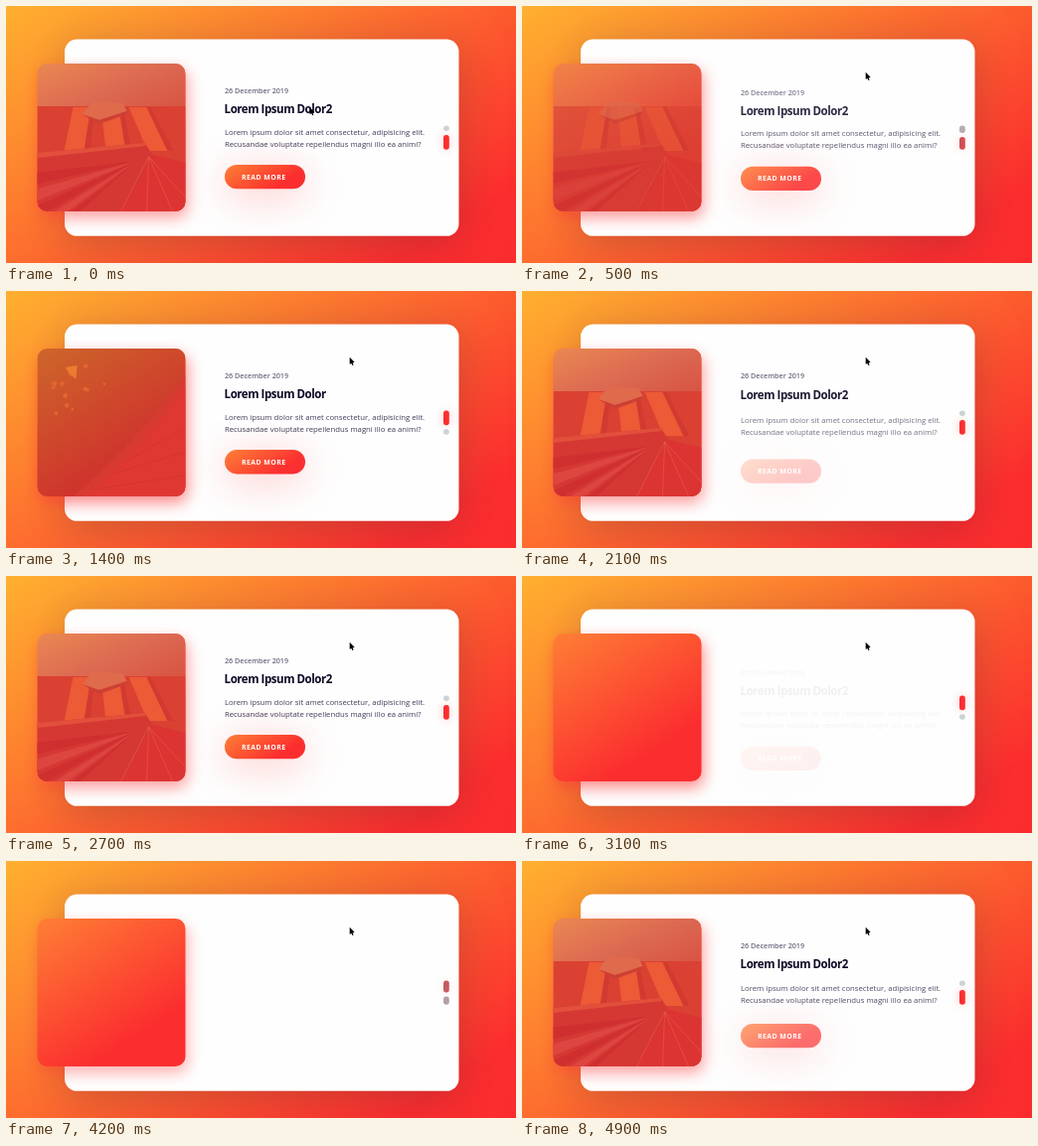
An HTML page with a canvas that plays this animation: 513x259 px, repeating every 5 s.

```html
<!DOCTYPE html>
<html lang="en">
<head>
<meta charset="utf-8">
<title>Blog slider</title>
<style>
html, body { margin: 0; width: 100%; height: 100%; overflow: hidden; background: #fd6a2e; }
canvas { display: block; width: 513px; height: 259px; }
</style>
</head>
<body>
<canvas id="stage"></canvas>
<script>
const W = 513, H = 259, LOOP = 5000, STEP = 100;
const dpr = window.devicePixelRatio || 1;
const canvas = document.getElementById('stage');
canvas.width = Math.round(W * dpr);
canvas.height = Math.round(H * dpr);
const ctx = canvas.getContext('2d');
ctx.scale(dpr, dpr);

const FONT = '"Open Sans", "Noto Sans", sans-serif';
const CARD = { x: 59, y: 33.5, w: 396.5, h: 198.3, r: 12.4 };
const BOX = { x: 31.5, y: 58, w: 149, h: 149, r: 10 };
const BUTTON = { x: 220, y: 160, w: 81, h: 24.3, r: 12.1 };
const SIDE = BOX.w;
const DROP = 12.4;
const WARM = '#fe7f35', RED = '#fb2e2f';

// Each change swaps between slides 2 and 1; the loop opens on slide 2
const changes = [-LOOP, 450, 1430, 2820, 4140];

const clamp = v => Math.min(1, Math.max(0, v));
const mix = (a, b, k) => a + (b - a) * k;

// cubic-bezier(.25, .1, .25, 1)
function ease(v) {
  const x = clamp(v);
  if (x === 0 || x === 1) return x;
  const curve = (s, a, b) => 3 * s * (1 - s) ** 2 * a + 3 * s * s * (1 - s) * b + s ** 3;
  let lo = 0, hi = 1;
  for (let i = 0; i < 24; i++) {
    const mid = (lo + hi) / 2;
    if (curve(mid, .25, .25) < x) lo = mid; else hi = mid;
  }
  return curve(lo, .1, 1);
}

function seeded(seed) {
  return () => (seed = seed * 16807 % 2147483647) / 2147483647;
}

// Linear gradient at 147 degrees, as in CSS
function slant(b, from, to, end = .74) {
  const a = 147 * Math.PI / 180, sx = Math.sin(a), sy = -Math.cos(a);
  const half = (b.w * sx + b.h * sy) / 2;
  const cx = b.x + b.w / 2, cy = b.y + b.h / 2;
  const g = ctx.createLinearGradient(cx - sx * half, cy - sy * half, cx + sx * half, cy + sy * half);
  g.addColorStop(0, from);
  g.addColorStop(end, to);
  return g;
}

function roundPath(b) {
  ctx.beginPath();
  ctx.roundRect(b.x, b.y, b.w, b.h, b.r);
}

function panel(b, fill, alpha, shadow) {
  ctx.save();
  ctx.globalAlpha = alpha;
  ctx.shadowColor = shadow.color;
  ctx.shadowBlur = shadow.blur * dpr;
  ctx.shadowOffsetX = (shadow.x || 0) * dpr;
  ctx.shadowOffsetY = (shadow.y || 0) * dpr;
  ctx.fillStyle = fill;
  roundPath(b);
  ctx.fill();
  ctx.restore();
}

function label(str, x, y, font, color, spacing = 0) {
  ctx.font = font + ' ' + FONT;
  ctx.letterSpacing = spacing + 'px';
  ctx.fillStyle = color;
  ctx.fillText(str, x, y);
}

function poly(color, ...pts) {
  ctx.fillStyle = color;
  ctx.beginPath();
  for (let i = 0; i < pts.length; i += 2) ctx.lineTo(pts[i], pts[i + 1]);
  ctx.fill();
}

// Both pictures use local coordinates, 0 to SIDE
function leaves() {
  ctx.fillStyle = slant({ x: 0, y: 0, w: SIDE, h: SIDE }, '#cd662a', '#cf302d');
  ctx.fillRect(0, 0, SIDE, SIDE);

  // Cloth in the lower right corner, with a hem and stitched rows
  for (const [shift, color] of [[0, '#d63a30'], [12, '#df3833']]) {
    ctx.fillStyle = color;
    ctx.beginPath();
    ctx.moveTo(SIDE, 27 + shift);
    ctx.quadraticCurveTo(112 + shift / 2, 80 + shift / 2, 36 + shift, SIDE);
    ctx.lineTo(SIDE, SIDE);
    ctx.fill();
  }
  ctx.strokeStyle = 'rgba(190,36,42,.4)';
  ctx.lineWidth = .7;
  for (let i = 0; i < 3; i++) {
    ctx.beginPath();
    ctx.moveTo(SIDE, 80 + i * 24);
    ctx.lineTo(92 - i * 18, 112 + i * 15);
    ctx.stroke();
  }

  const rnd = seeded(11);
  for (let i = 0; i < 12; i++) {
    const x = 16 + 62 * rnd(), y = 12 + 62 * rnd(), r = 1.5 + 2 * rnd();
    poly('#e4652f', x - r, y, x, y - r, x + r, y - r / 2, x + r / 3, y + r);
  }
  poly('#ea7c2f', 28, 19, 40, 17, 39, 31, 33, 26);
}

function building() {
  const sky = ctx.createLinearGradient(0, 0, 50, 110);
  sky.addColorStop(0, '#ea8852');
  sky.addColorStop(.45, '#dc6a52');
  sky.addColorStop(1, '#d64a3c');
  ctx.fillStyle = sky;
  ctx.fillRect(0, 0, SIDE, SIDE);

  poly('#da4132', 0, 43, SIDE, 43, SIDE, SIDE, 0, SIDE);

  // Columns fan out towards the viewer
  for (let i = 0; i < 3; i++) {
    const top = 36 + 28 * i, foot = 27 + 42 * i;
    poly('#ec5a36', top, 44, top + 18, 44, foot + 20, 88, foot, 88);
    poly('#d23a31', top + 18, 44, top + 22, 44, foot + 26, 88, foot + 20, 88);
  }
  poly('#df6a4c', 45, 51, 56, 38, 86, 40, 90, 48, 62, 57);
  poly('#cc4034', 45, 51, 62, 57, 90, 48, 90, 51, 62, 61);

  // Eave, then boards that meet under its tip
  poly('#d53833', 0, 90, 108, 80, 116, 92, 90, SIDE, 0, SIDE);
  poly('#e2503c', 0, 90, 108, 80, 109, 83, 0, 95);
  poly('#dc3432', 116, 92, SIDE, 100, SIDE, SIDE, 84, SIDE);
  for (let i = 0; i < 5; i++) {
    const y = 112 + i * 20;
    poly(i % 2 ? '#dd4540' : '#d02f30', 100, 98, -20, y, -20, y + 14);
  }
  ctx.strokeStyle = 'rgba(240,110,80,.5)';
  ctx.lineWidth = .8;
  for (let i = 0; i < 4; i++) {
    ctx.beginPath();
    ctx.moveTo(112, 94);
    ctx.lineTo(84 + i * 26, SIDE);
    ctx.stroke();
  }
}

function picture(draw, alpha) {
  if (alpha <= 0) return;
  ctx.save();
  roundPath(BOX);
  ctx.clip();
  ctx.globalAlpha = alpha;
  ctx.translate(BOX.x, BOX.y);
  draw();
  ctx.restore();
}

const parts = [
  () => label('26 December 2019', 220, 88, '600 7.2px', '#67657c'),
  slide => label('Lorem Ipsum Dolor' + (slide === 2 ? '2' : ''), 219.6, 108.2, '700 11.5px', '#0d0925', -.45),
  () => {
    const lines = ['Lorem ipsum dolor sit amet consectetur, adipisicing elit.',
      'Recusandae voluptate repellendus magni illo ea animi?'];
    lines.forEach((s, i) => label(s, 220, 129.8 + 11.9 * i, '500 7.74px', '#3f3b58'));
  },
  () => {
    panel(BUTTON, slant(BUTTON, WARM, RED), ctx.globalAlpha,
      { color: 'rgba(252,56,56,.3)', blur: 40, y: 7 });
    // White on a white card stays solid while the button fades
    ctx.globalAlpha = 1;
    label('READ MORE', 237, 174.8, '700 6.9px', '#fff', .45);
  }
];

// shown(i) gives how far part i has arrived, from 0 to 1
function content(slide, shown) {
  parts.forEach((draw, i) => {
    const k = shown(i);
    if (k <= 0) return;
    ctx.save();
    ctx.globalAlpha = k;
    ctx.translate(0, DROP * (1 - k));
    draw(slide);
    ctx.restore();
  });
}

function bullets(slide, k) {
  const first = slide === 1 ? k : 1 - k;
  let y = 120.4;
  for (const on of [first, 1 - first]) {
    const h = mix(5.5, 14.9, on);
    const rgb = [mix(6, 251, on), mix(39, 46, on), mix(68, 48, on)].map(Math.round);
    panel({ x: 440, y, w: 5.8, h, r: 2.75 }, `rgb(${rgb})`, mix(.2, 1, on),
      { color: `rgba(252,56,56,${.3 * on})`, blur: 10 });
    y += h + 4;
  }
}

function pointer(t) {
  const k = ease(t / 450);
  ctx.save();
  ctx.translate(mix(305.5, 345.7, k), mix(102, 66.8, k));
  ctx.strokeStyle = '#000';
  ctx.lineWidth = 1.3;
  ctx.beginPath();
  ctx.moveTo(1.5, 4);
  ctx.lineTo(3.3, 8);
  ctx.stroke();
  poly('#000', 0, 0, 0, 7, 4.9, 5);
  ctx.restore();
}

function render(t) {
  const bg = ctx.createLinearGradient(0, 0, 234, 361);
  bg.addColorStop(0, '#ffb02f');
  bg.addColorStop(1, '#fb2c2d');
  ctx.fillStyle = bg;
  ctx.fillRect(0, 0, W, H);
  panel(CARD, '#fefefe', 1, { color: 'rgba(34,35,58,.22)', blur: 40, y: 7 });

  const turn = changes.filter(at => at <= t).length - 1;
  const slide = turn % 2 ? 1 : 2;
  const age = t - changes[turn];
  const fade = ease(age / 300);

  // Stacked slides add up their shadows
  const layers = (slide === 1 ? 3 : 2) + fade;
  panel(BOX, slant(BOX, WARM, RED), 1,
    { color: `rgba(252,56,56,${1 - .8 ** layers})`, blur: 15, x: 2, y: 6.5 });

  // Slide 2 fades away; slide 1 is cut at once when the slider wraps
  if (slide === 1) {
    picture(building, (1 - fade) ** 2);
    content(2, () => 1 - ease(age / 400));
  }
  picture(slide === 1 ? leaves : building, ease((age - 300) / 300));
  content(slide, i => ease((age - 300 - i * 100) / 400));

  bullets(slide, fade);
  pointer(t);
}

const start = performance.now();
function tick() {
  const t = (performance.now() - start) % LOOP;
  render(Math.floor(t / STEP) * STEP);
  requestAnimationFrame(tick);
}
tick();
</script>
</body>
</html>
```
